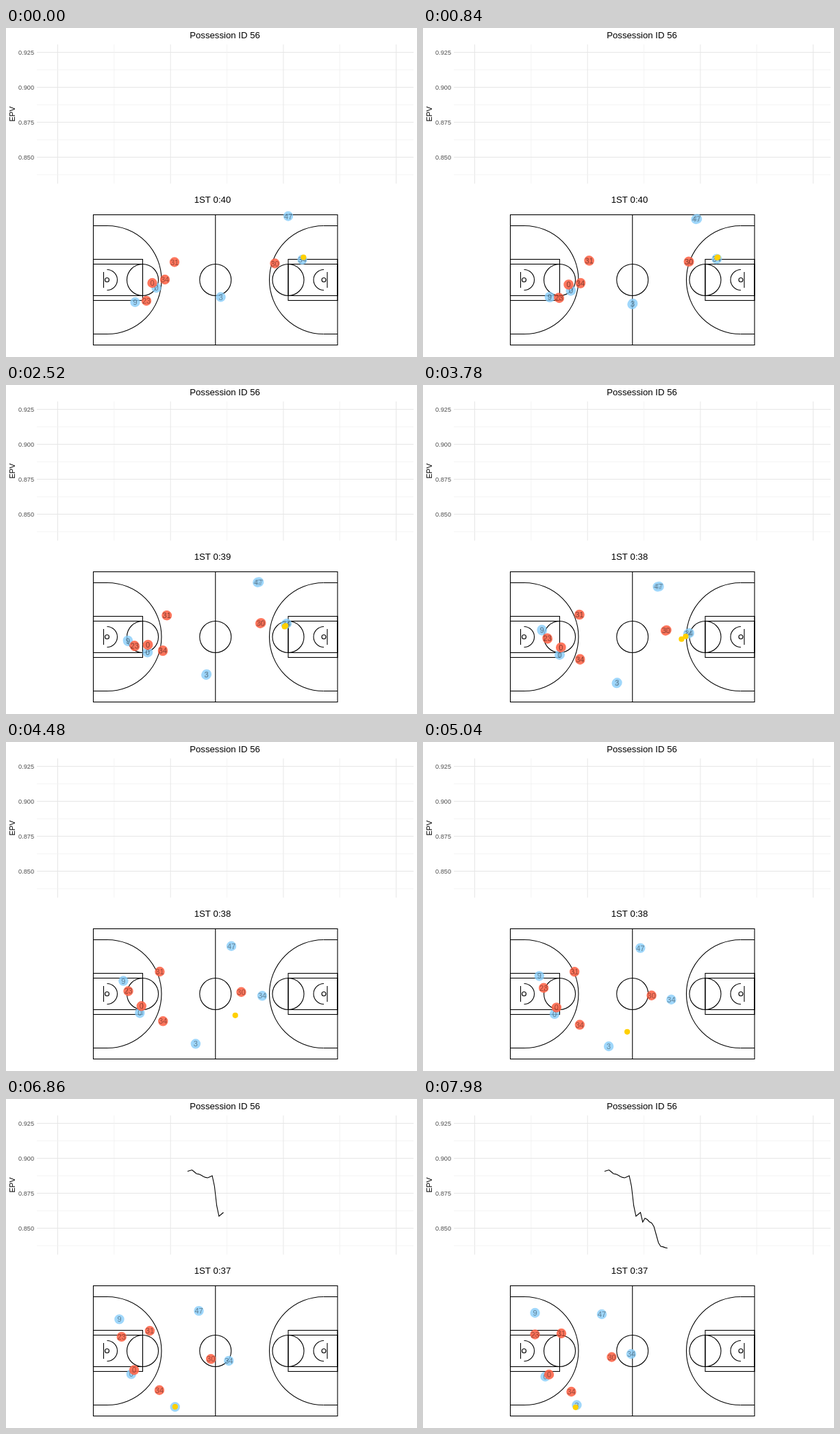
Recreate the animation shown at these times as an HTML page with a canvas. Size 600 px wide and 480 px high, loop 8 s.

```html
<!DOCTYPE html>
<html>
<head>
<meta charset="utf-8">
<style>
  html, body { margin: 0; width: 100%; height: 100%; overflow: hidden; background: #fff; }
  canvas { display: block; }
</style>
</head>
<body>
<canvas id="stage" width="600" height="480"></canvas>
<script>
const ctx = document.getElementById('stage').getContext('2d');
const LOOP = 8000, STEP = 140;
const THIRD = 28;                  // rows between the key points of a path
const CHART_START = 56;            // row at which the EPV line begins
const RELEASE = 38, CATCH = 58;    // rows of the pass

const player = (label, ...path) => ({ label, path });
const passer = player('34', [432.5, 338], [407, 350], [356.5, 378], [304, 372]);
const receiver = player('3', [313.5, 392.5], [291.5, 424], [268, 445.5], [224.5, 446.5]);
const blue = [
  player('47', [412, 274.5], [365.5, 288.5], [311.5, 302], [261, 314]),
  passer,
  receiver,
  player('0', [219.5, 379], [206, 390.5], [190.5, 397.5], [178.5, 405]),
  player('9', [188.5, 400], [177.5, 371.5], [169, 338], [163.5, 312])
];
const red = [
  player('31', [246, 341.5], [234, 336], [219.5, 335.5], [202, 342]),
  player('34', [232, 367], [229, 389], [228.5, 415], [216.5, 427]),
  player('0', [213.5, 372], [206.5, 379.5], [193.5, 388.5], [184, 402]),
  player('23', [205, 398], [187, 379.5], [175, 356.5], [163.5, 343.5]),
  player('30', [392.5, 343.5], [370, 348.5], [328.5, 372], [275.5, 376.5])
];
// Turning points of the EPV line: [rows since its start, y].
const epv = [[0, 105.5], [2, 103.5], [4, 109], [9, 115], [11, 112], [14, 171],
  [16, 165.5], [17, 179.5], [18, 174], [21, 181], [25, 215], [28, 217.5]];

// Cubic through four evenly spaced values.
function cubic(a, b, c, d, t) {
  const d1 = b - a, d2 = c - 2 * b + a, d3 = d - 3 * c + 3 * b - a;
  return a + t * (d1 + (t - 1) / 2 * (d2 + (t - 2) / 3 * d3));
}

const place = (p, row) => [0, 1].map(k => cubic(...p.path.map(pt => pt[k]), row / THIRD));

// The ball circles slightly around whoever holds it.
function held(p, row) {
  const [x, y] = place(p, row), swing = Math.cos(2 * Math.PI * row / 58);
  return [x + 1.8 * swing, y - 3.5 * swing];
}

function ballAt(row) {
  if (row <= RELEASE) return held(passer, row);
  if (row >= CATCH) return held(receiver, row);
  const from = held(passer, RELEASE), to = held(receiver, CATCH);
  const u = (row - RELEASE) / (CATCH - RELEASE);
  return from.map((v, k) => v + (to[k] - v) * u);
}

function epvAt(i) {
  const k = Math.max(1, epv.findIndex(p => p[0] >= i));
  const [i0, y0] = epv[k - 1], [i1, y1] = epv[k];
  const u = (i - i0) / (i1 - i0);
  return y0 + (y1 - y0) * u * u * (3 - 2 * u);
}

function text(str, x, y, size, color, align = 'center') {
  ctx.font = size + 'px "Liberation Sans", Arial, sans-serif';
  ctx.fillStyle = color;
  ctx.textAlign = align;
  ctx.fillText(str, x, y);
}

function line(x1, y1, x2, y2) {
  ctx.beginPath();
  ctx.moveTo(x1, y1);
  ctx.lineTo(x2, y2);
  ctx.stroke();
}

function arc(x, y, r, from = 0, to = 2 * Math.PI) {
  ctx.beginPath();
  ctx.arc(x, y, r, from, to);
  ctx.stroke();
}

// One shared path, so overlapping dots do not darken each other.
function dots(points, r, color) {
  ctx.beginPath();
  for (const [x, y] of points) {
    ctx.moveTo(x + r, y);
    ctx.arc(x, y, r, 0, 2 * Math.PI);
  }
  ctx.fillStyle = color;
  ctx.fill();
}

function drawChart(row) {
  for (let i = 0; i < 8; i++) {
    const minor = i % 2;
    ctx.strokeStyle = minor ? '#f0f0f0' : '#e6e6e6';
    ctx.lineWidth = minor ? 0.8 : 1;
    const x = 75.5 + 82.35 * i, y = 35.5 + 25.5 * i;
    line(45, y, 595, y);
    if (x < 595) line(x, 24, x, 227);
    if (!minor) text((0.925 - 0.0125 * i).toFixed(3), 41, y + 3.5, 9.2, '#4d4d4d', 'right');
  }
  text('Possession ID 56', 319.5, 15, 13.2, '#000');
  ctx.save();
  ctx.translate(13, 125.5);
  ctx.rotate(-Math.PI / 2);
  text('EPV', 0, 0, 11, '#000');
  ctx.restore();

  ctx.strokeStyle = '#000';
  ctx.lineWidth = 1.1;
  ctx.beginPath();
  for (let i = 0; i <= row - CHART_START; i++) ctx.lineTo(265 + 3.28 * i, epvAt(i));
  ctx.stroke();
}

function drawHalf() {
  const q = Math.PI / 2;
  ctx.strokeRect(127.5, 337.5, 72, 60);
  ctx.strokeRect(127.5, 344.5, 72, 46);
  line(127.5, 288.5, 148, 288.5);
  line(127.5, 446.5, 148, 446.5);
  arc(148, 367.5, 79, -q, q);
  arc(199.5, 367.5, 23);
  arc(147.5, 367.5, 3);
  arc(147.5, 367.5, 15, -q, q);
  line(142.5, 356, 142.5, 379);
}

function drawCourt() {
  ctx.strokeStyle = '#000';
  ctx.lineWidth = 1.1;
  ctx.strokeRect(127.5, 272.5, 356.5, 190);
  line(305.75, 272.5, 305.75, 462.5);
  arc(305.75, 367.5, 23);
  drawHalf();
  ctx.save();
  ctx.translate(611.5, 0);
  ctx.scale(-1, 1);
  drawHalf();
  ctx.restore();
}

function drawTeam(team, rows, color) {
  const ink = `rgba(0,0,0,${0.4 / Math.sqrt(rows.length)})`;
  dots(rows.flatMap(r => team.map(p => place(p, r))), 7.2, color);
  for (const r of rows) {
    for (const p of team) {
      const [x, y] = place(p, r);
      text(p.label, x, y + 4, 11, ink);
    }
  }
}

const rowAt = n => Math.floor(1.475 * n + 0.47);

function draw(t) {
  const n = Math.floor(t / STEP), row = rowAt(n);
  // Some steps cover two sample rows, which are then drawn over each other.
  const rows = n && row - rowAt(n - 1) > 1 ? [row - 1, row] : [row];
  ctx.fillStyle = '#fff';
  ctx.fillRect(0, 0, 600, 480);
  drawChart(row);
  text('1ST 0:' + (40 - Math.floor((row + 12.2) / 24.7)), 301.5, 255, 13.2, '#000');
  drawCourt();
  drawTeam(blue, rows, 'rgba(135,206,250,.8)');
  drawTeam(red, rows, 'rgba(255,99,71,.88)');
  dots(rows.map(ballAt), 4.1, '#ffd000');
}

const start = performance.now();
function tick() {
  draw((performance.now() - start) % LOOP);
  requestAnimationFrame(tick);
}
tick();
</script>
</body>
</html>
```
